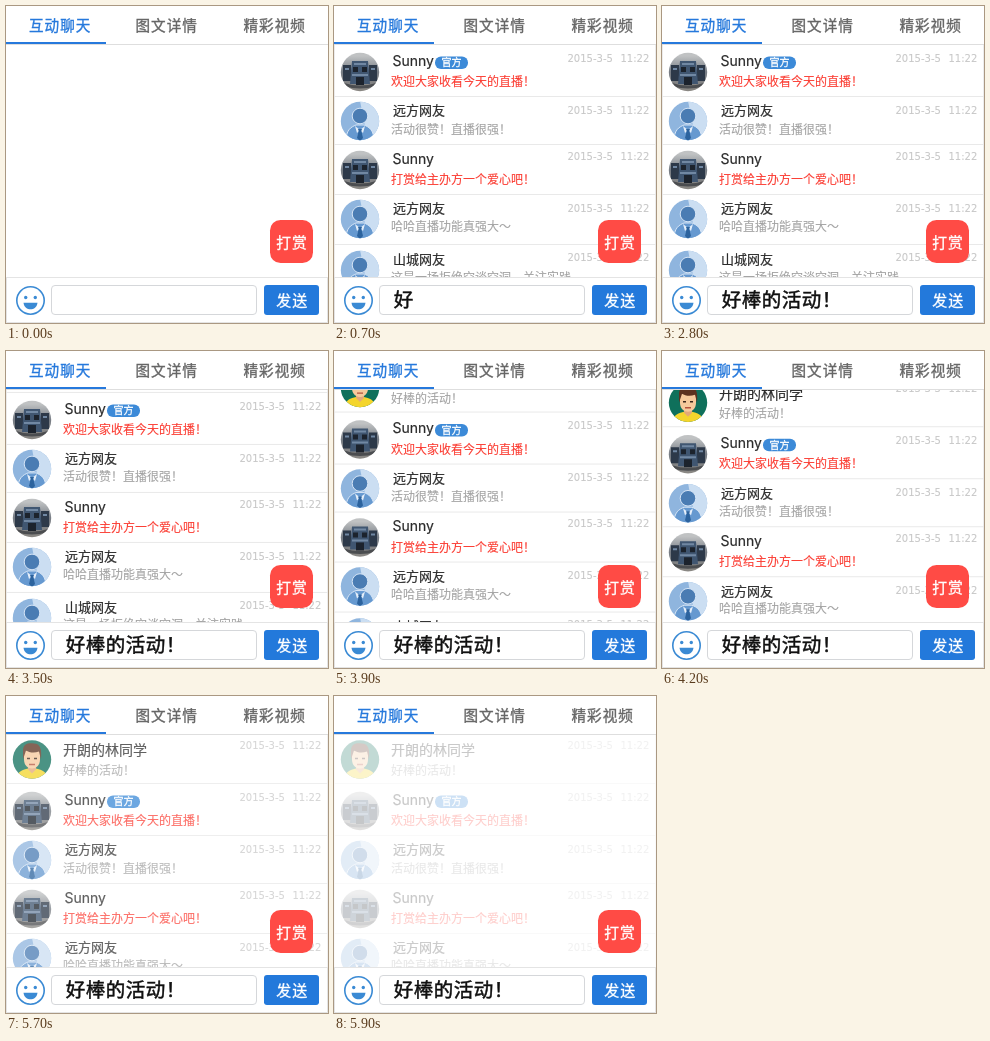
Recreate the animation shown at these times as an HTML page. Size 322x317 px, loop 6 s.

```html
<!DOCTYPE html>
<html lang="zh-CN">
<head>
<meta charset="utf-8">
<style>
  html, body { margin: 0; width: 100%; height: 100%; overflow: hidden; background: #fff; }
  svg { display: block; }
  text { font-family: Inter, "Noto Sans CJK SC", "Noto Sans CJK", sans-serif; white-space: pre; }
  .date { font-family: "DejaVu Sans", sans-serif; }
</style>
</head>
<body>
<svg id="stage" width="322" height="317" viewBox="0 0 322 317">
  <defs>
    <clipPath id="round"><circle r="19.2"/></clipPath>
    <linearGradient id="haze" x2="0" y2="1">
      <stop offset=".1" stop-color="#c0c2c3"/>
      <stop offset=".5" stop-color="#777d85"/>
      <stop offset="1" stop-color="#8b8883"/>
    </linearGradient>
    <g id="machine" clip-path="url(#round)">
      <rect x="-20" y="-20" width="40" height="40" fill="url(#haze)"/>
      <path d="M-17-7H-9V9H-17ZM9-7H17V9H9Z" fill="#2d3949"/>
      <path d="M-8-11H8L10 12H-10Z" fill="#405671"/>
      <path d="M-15-3H-11M11-3H15M-6-8H6M-8 3H8" stroke="#7188a3" stroke-width="2"/>
      <path d="M-7-5H-2V0H-7ZM2-5H7V0H2ZM-4 5H4V13H-4Z" fill="#1c232d"/>
      <path d="M-16 11Q0 16 16 11V14Q0 19-16 14Z" fill="#4b4d50"/>
    </g>
    <g id="guest" clip-path="url(#round)">
      <rect x="-20" y="-20" width="40" height="40" fill="#8fb5de"/>
      <path d="M0-20H20V20H8Z" fill="#cbdef2"/>
      <path d="M-14 20C-14 9-9 6-4 4H4C9 6 14 9 14 20Z" fill="#6699d0" stroke="#d5e4f5"/>
      <circle cy="-5" r="7.8" fill="#4a7cb3" stroke="#d5e4f5"/>
      <path d="M-5 5L0 9L5 5L3 12L0 9L-3 12Z" fill="#e4eef9"/>
      <path d="M-2 8H2L1.3 10L3 17L0 20L-3 17L-1.3 10Z" fill="#2c639e"/>
    </g>
    <g id="cartoon" clip-path="url(#round)">
      <rect x="-20" y="-20" width="40" height="40" fill="#0f705b"/>
      <path d="M-16 20C-15 12-9 10-4 9H4C9 10 15 12 16 20Z" fill="#f4d52c"/>
      <path d="M-4 5H4V10L0 14L-4 10Z" fill="#e3a877"/>
      <path d="M-8-9H8V0C8 6 4 9 0 9S-8 6-8 0Z" fill="#f6c99b"/>
      <path d="M-9 0V-9C-9-16-3-17 2-16C8-16 10-11 9 0L7-8C2-6-3-7-6-9Z" fill="#5c321f"/>
      <path d="M-5-1H-2M2-1H5" stroke="#3b261a" stroke-width="1.6"/>
      <path d="M-3 5H3" stroke="#b5533c" stroke-width="1.3"/>
    </g>
  </defs>

  <svg y="39" width="322" height="232" viewBox="0 39 322 232">
    <g id="list">
      <path d="M.5 39V271M321.5 39V271" stroke="#ececec"/>
      <g id="rows"></g>
    </g>
  </svg>

  <path d="M0 38.5H322" stroke="#dedede"/>
  <rect y="36" width="100" height="2" fill="#2679dc"/>
  <rect x=".5" y="271.5" width="321" height="45" fill="#fff" stroke="#e4e4e4"/>
  <rect x="45.5" y="279.5" width="205" height="29" rx="3.5" fill="#fff" stroke="#d5d7da"/>
  <g fill="#3a8ad4">
    <circle cx="24.5" cy="294.5" r="13.7" fill="none" stroke="#3a8ad4" stroke-width="1.6"/>
    <circle cx="19.7" cy="291.5" r="1.7"/>
    <circle cx="29.3" cy="291.5" r="1.7"/>
    <path d="M17.5 296.7H31.5C30.5 305.5 18.5 305.5 17.5 296.7Z"/>
  </g>
  <rect x="264" y="214" width="43" height="43" rx="10.5" fill="#ff4b45"/>
  <rect x="258" y="279" width="55" height="30" rx="3" fill="#2379db"/>
  <rect id="press" x="258" y="279" width="55" height="30" rx="3" fill="#0b3f86"/>
  <g id="labels"></g>
  <g id="typed"></g>
</svg>
<script>
const $ = id => document.getElementById(id);

// Text placed by its left edge and vertical centre; a thin outline sets its weight
const label = (x, cy, size, color, str, { bold = 0.1, gap = 0, kind = '' } = {}) =>
  `<text class="${kind}" x="${x}" y="${cy + size * 0.38}" font-size="${size}" letter-spacing="${gap}"
    fill="${color}" stroke="${color}" stroke-width="${bold}">${str}</text>`;

const RED = '#fb3a30', GREY = '#a3a3a3', PALE = '#c8c8c8';
const ROW_HEIGHT = 49;

const rows = [
  { avatar: 'cartoon', face: 14.5, name: '开朗的林同学', x: 57, size: 14, nameY: 5, msg: '好棒的活动！', msgY: 25, dateY: 0, line: 38 },
  { avatar: 'machine', face: 66, name: 'Sunny', x: 58.5, size: 14, nameY: 54.5, msg: '欢迎大家收看今天的直播！', msgY: 75.5, color: RED, dateY: 52, line: 90, badge: true },
  { avatar: 'guest', face: 115, name: '远方网友', x: 59, size: 13, nameY: 104.5, msg: '活动很赞！直播很强！', msgY: 123, dateY: 104, line: 138 },
  { avatar: 'machine', face: 164, name: 'Sunny', x: 58.5, size: 14, nameY: 152.5, msg: '打赏给主办方一个爱心吧！', msgY: 173.5, color: RED, dateY: 150, line: 188 },
  { avatar: 'guest', face: 213, name: '远方网友', x: 59, size: 13, nameY: 202.5, msg: '哈哈直播功能真强大～', msgY: 220.5, dateY: 202, line: 238 },
  { avatar: 'guest', face: 264, name: '山城网友', x: 59, size: 13, nameY: 253, msg: '这是一场拒绝空谈空洞，关注实践', msgY: 271, dateY: 251, line: 288 },
];

const badge = cy =>
  `<rect x="101" y="${cy - 6}" width="33" height="12.5" rx="6" fill="#3c8ad8"/>` +
  label(107.5, cy, 10, '#fff', '官方', { bold: 0.3 });

$('rows').innerHTML = rows.map(r =>
  `<path d="M0 ${r.line + 0.5}H322" stroke="#e9e9e9"/>` +
  `<use href="#${r.avatar}" x="26" y="${r.face}"/>` +
  label(r.x, r.nameY, r.size, '#2b2b2b', r.name, { bold: 0.2 }) +
  (r.badge ? badge(r.nameY + 2) : '') +
  label(57, r.msgY, 12, r.color || GREY, r.msg) +
  label(233.5, r.dateY, 10, PALE, '2015-3-5', { kind: 'date' }) +
  label(286.5, r.dateY, 10, PALE, '11:22', { kind: 'date' })
).join('');

const heading = { bold: 0.35, gap: 1 };
$('labels').innerHTML =
  label(23, 19, 14.6, '#2679dc', '互动聊天', heading) +
  label(129.5, 19, 14.6, '#666', '图文详情', heading) +
  label(237.5, 19, 14.6, '#666', '精彩视频', heading) +
  label(270.3, 236, 14.8, '#fff', '打赏', heading) +
  label(270.3, 294, 15, '#fff', '发送', heading);

const message = '好棒的活动！';
const keyTimes = [700, 1100, 1500, 1900, 2400, 2800];
$('typed').innerHTML = [...message].map((ch, i) => label(59.7 + i * 20, 294, 19.5, '#111', ch, { bold: 0.5 })).join('');
const keys = [...$('typed').children];

const clamp = v => Math.max(0, Math.min(1, v));

function render(now) {
  const t = Math.floor(now % 6000 / 100) * 100;
  const shift = ROW_HEIGHT * clamp((t - 3440) / 1000);
  $('rows').setAttribute('transform', `translate(0 ${shift})`);
  $('list').setAttribute('opacity', Math.min(clamp(t / 400), clamp((6000 - t) / 400)));
  $('press').setAttribute('opacity', 0.5 * clamp(1 - Math.abs(t - 3000) / 200));
  keys.forEach((key, i) => key.setAttribute('visibility', t >= keyTimes[i] ? 'visible' : 'hidden'));
}

const start = performance.now();
function frame() {
  render(performance.now() - start);
  requestAnimationFrame(frame);
}
frame();
</script>
</body>
</html>
```
